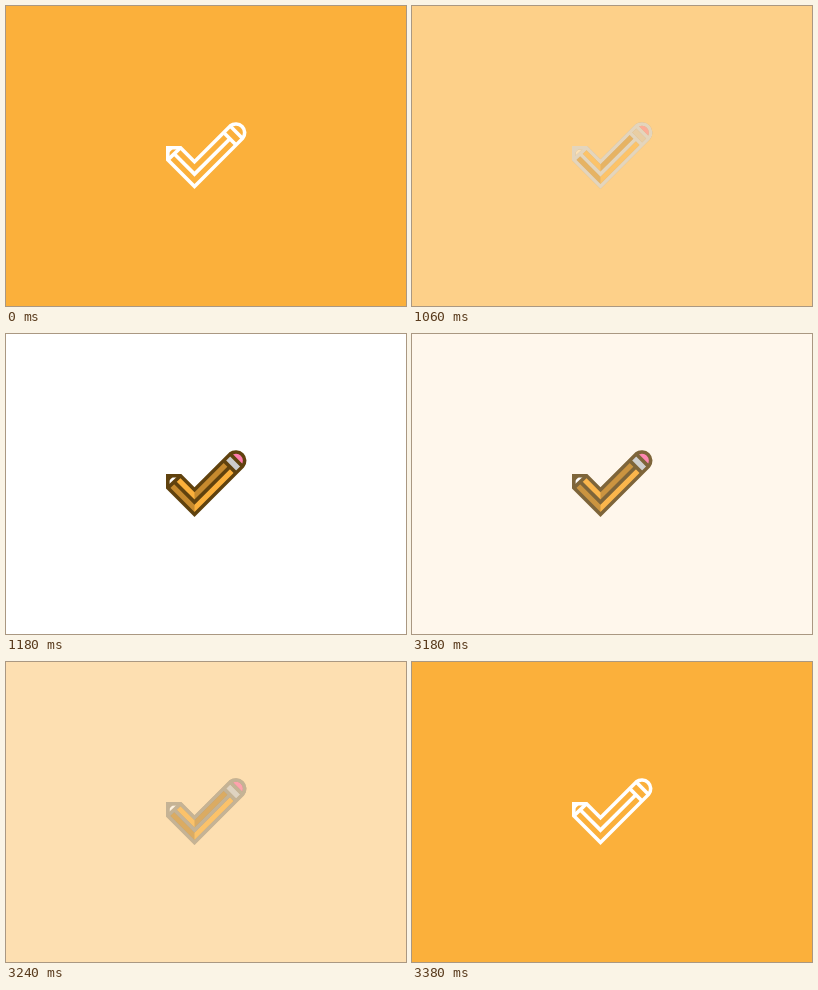
An HTML page that plays this animation: 400x300 px, repeating every 4.38 s.

```html
<!DOCTYPE html>
<html lang="en">
<head>
<meta charset="utf-8">
<title>Pencil check</title>
<style>
  html, body { margin: 0; width: 100%; height: 100%; overflow: hidden; background: #fbb03b; }
  svg { display: block; width: 100%; height: 100%; }
  .lines { fill: none; stroke-width: 3.6; stroke-miterlimit: 6; }
</style>
</head>
<body>
<svg viewBox="0 0 400 300" aria-label="Pencil bent into a check mark">
  <defs>
    <path id="shape" d="M161.8 141.7H174.55L188.5 155.65L224.2 120A8.8 8.8 0 0 1 236.6 132.4L188.5 180.55L161.8 153.85Z"/>
    <g id="outline">
      <use href="#shape"/>
      <path d="M161.8 153.85L174.55 141.7M168.2 147.8L188.5 168.1L223.9 132.7M217.7 126.5L230.1 138.9M224.2 120L236.6 132.4"/>
    </g>
    <path id="lead" d="M161.8 141.7H168L161.8 147.9Z"/>
  </defs>

  <rect width="400" height="300" fill="#fbb03b"/>
  <rect id="paper" width="400" height="300" fill="#fff" opacity="0"/>

  <g id="colored" opacity="0">
    <use href="#shape" fill="#fbb03b"/>
    <path fill="#c68a2e" d="M161.8 153.85L168.2 147.8L188.5 168.1V180.55ZM188.5 155.65L217.7 126.5L223.9 132.7L188.5 168.1Z"/>
    <path fill="#fff" d="M161.8 141.7H174.55L161.8 153.85Z"/>
    <path fill="#ccc" d="M217.7 126.5L224.2 120L236.6 132.4L230.1 138.9Z"/>
    <path fill="#ff7bac" d="M224.2 120A8.8 8.8 0 0 1 236.6 132.4Z"/>
    <use href="#lead" fill="#60420e"/>
    <use href="#outline" class="lines" stroke="#60420e"/>
  </g>

  <g id="white">
    <use href="#lead" fill="#fff"/>
    <use href="#outline" class="lines" stroke="#fff"/>
  </g>
</svg>
<script>
  const LOOP = 4380, STEP = 20;
  const [paper, colored, white] = ['paper', 'colored', 'white'].map(id => document.getElementById(id));
  const start = performance.now();

  // Hard 10% steps, the first one taken at once; the last waits for `end`.
  function fade(t, begin, end) {
    if (t < begin) return 0;
    if (t >= end) return 1;
    return Math.min(9, Math.floor((t - begin) / STEP) + 1) / 10;
  }

  function draw(now) {
    const t = Math.max(0, now - start) % LOOP;
    const p = fade(t, 1000, 1180) - fade(t, 3180, 3380);
    paper.setAttribute('opacity', p);
    colored.setAttribute('opacity', p);
    white.setAttribute('opacity', 1 - p);
    requestAnimationFrame(draw);
  }
  requestAnimationFrame(draw);
</script>
</body>
</html>
```
